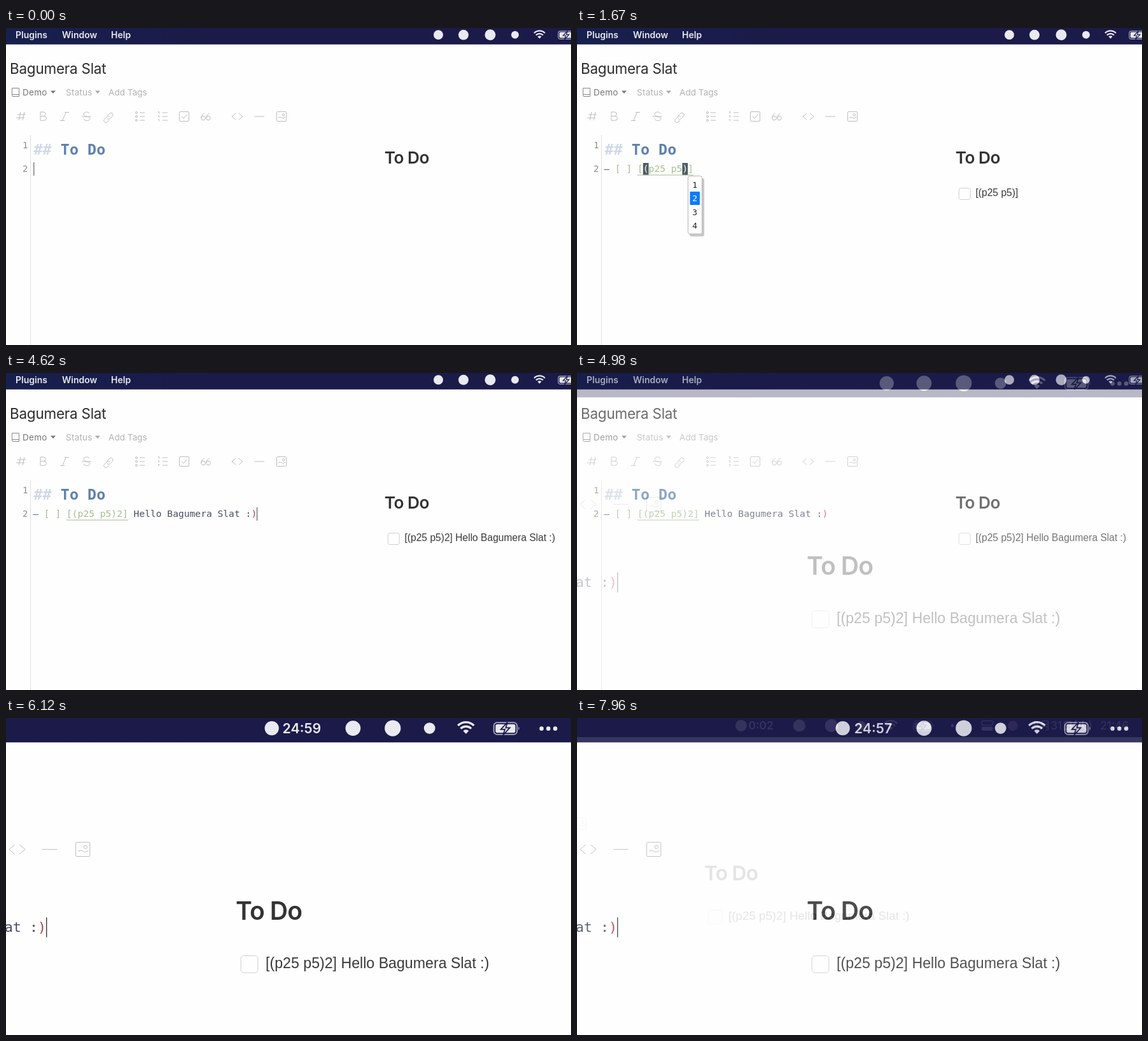
An HTML page that plays this animation: 888x498 px, repeating every 8 s.

```html
<!DOCTYPE html>
<html lang="en">
<head>
<meta charset="utf-8">
<title>Editor demo</title>
<style>
  html, body { margin: 0; width: 100%; height: 100%; overflow: hidden; background: #fefefe; }
  svg { display: block; width: 888px; height: 498px; }
  text { white-space: pre; font-family: Inter, "Noto Sans CJK JP", "Noto Sans CJK", sans-serif; }
  .mono { font-family: "DejaVu Sans Mono", monospace; }
  .preview { font-family: "Liberation Sans", sans-serif; }
  .line { fill: none; stroke: #bdbdbd; stroke-width: 1; vector-effect: non-scaling-stroke; }
</style>
</head>
<body>
<svg id="stage" viewBox="0 0 888 498"></svg>
<script>
const LOOP = 8000;
const NAME = 'Bagumera Slat';
const MESSAGE = ` Hello ${NAME} :)`;
const CHAR = 8.8, TEXT_X = 42.2;
const TYPE_START = 2430, TYPE_STEP = 82, PREVIEW_LAG = 328;
const WIDE = '', ZOOM = 'translate(-522.3 0) scale(1.485)', MID = 'translate(-515.6 -1) scale(1.203)';

const clamp = v => Math.max(0, Math.min(1, v));
const text = (x, y, size, fill, str, extra = '') =>
  `<text x="${x}" y="${y}" font-size="${size}" fill="${fill}" ${extra}>${str}</text>`;
const rect = (x, y, w, h, fill, extra = '') =>
  `<rect x="${x}" y="${y}" width="${w}" height="${h}" fill="${fill}" ${extra}/>`;
const dot = (x, y, r, fill) => `<circle cx="${x}" cy="${y}" r="${r}" fill="${fill}"/>`;
const path = (d, extra = 'class="line"') => `<path d="${d}" ${extra}/>`;
const mono = (col, str, fill) =>
  text(TEXT_X + col * CHAR, 226, 14.62, fill, str, 'class="mono"');

const toolbar =
  path('M20 145l3-13m3 13l3-13m-11 4h13m-15 5h13') +
  path('M54 132h5a3 3 0 010 6.5h-5zM54 138.5h6a3.3 3.3 0 010 6.7h-6z') +
  path('M85 145.5h7m0-13h7m-10.5 13l6-13') +
  path('M119 139h15M131 134.5c-1-4-9-3-9 1c0 4.5 10 3 10 7c0 4-9 4-10 0') +
  path('M159 138l4-4a3.2 3.2 0 014.5 4.5l-4 4a3.2 3.2 0 01-4.5 0M163 139.5a3.2 3.2 0 00-4.5 0l-4 4a3.2 3.2 0 004.5 4.5l3-3') +
  [133, 139, 145].map(y =>
    path(`M203.5 ${y}a1.5 1.5 0 113 0a1.5 1.5 0 11-3 0M210 ${y}h8M239 ${y - 1.5}h1.5v3M246 ${y}h8`)).join('') +
  rect(272.5, 131.5, 15, 15, 'none', 'class="line" rx="1.5"') + path('M276 139l3 3 5.5-6') +
  [310, 318].map(x =>
    path(`M${x - 3.3} 141.5a3.3 3.3 0 116.6 0a3.3 3.3 0 11-6.6 0q0-5 5-7.5`)).join('') +
  path('M361 134l-6 5 6 5M366 134l6 5-6 5M390 139h16') +
  rect(425.5, 131.5, 15, 15, 'none', 'class="line" rx="1"') +
  path('M434 136.5a1.8 1.8 0 113.6 0a1.8 1.8 0 11-3.6 0M428 141q3-2 5 0t6-1');

const header =
  text(6, 72, 22.5, '#2b2b2b', NAME, 'letter-spacing="-.25"') +
  path('M9.5 94.5h11v13h-9.5q-1.5 0-1.5-2zM9.5 104.5h11', 'fill="none" stroke="#888"') +
  text(26, 106, 13.6, '#777', 'Demo', 'letter-spacing=".2"') + path('M70 98.5h8l-4 4.5z', 'fill="#777"') +
  text(94, 106, 13.6, '#b2b2b2', 'Status', 'letter-spacing=".2"') + path('M140 98.5h8l-4 4.5z', 'fill="#aaa"') +
  text(161, 106, 13.6, '#b2b2b2', 'Add Tags');

function menuBar(timer, expanded) {
  const ink = '#e9e9f1';
  const timerIconX = !timer ? 679.5 : timer.length > 4 ? 633 : 643;
  const menus = [[15, 'Plugins'], [88, 'Window'], [165, 'Help']]
    .map(([x, label]) => text(x, 15.5, 14, ink, label, 'font-weight="600"')).join('');
  const marks = [[timerIconX, 7.5], [719, 8], [761, 8.5], [800, 6]]
    .map(([x, r]) => dot(x, 10.8, r, ink)).join('');
  const wifi =
    path('M830 8a12 12 0 0117 0M832.9 11.2a8 8 0 0111.2 0', `fill="none" stroke="${ink}" stroke-width="2.3"`) +
    path('M835.5 13.6a4.2 4.2 0 016 0l-3 3.2z', `fill="${ink}"`);
  const battery =
    rect(868, 4.8, 24.6, 12.6, 'none', 'rx="3.5" stroke="#a9a9bd" stroke-width="1.2"') +
    rect(869.8, 6.6, 21, 9, ink, 'rx="2"') + path('M894 9v4q2-2 0-4', 'fill="#a9a9bd"') +
    path('M882.5 4.5l-7 7.5h4.2l-1.8 6 7-7.7h-4.2z', `fill="${ink}" stroke="#1b1a49" stroke-width="1.2"`);
  const right = expanded
    ? dot(919, 10.8, 2, ink) +
      rect(957, 4.5, 15, 5.5, 'none', `rx="2.8" stroke="${ink}"`) + rect(957, 12, 15, 5.5, ink, 'rx="2.8"') +
      dot(998, 11, 6.5, '#b88cc0') +
      text(1024, 16, 14.6, ink, '5月31日(火)') + text(1112, 16, 14.6, ink, '21:46')
    : [918.5, 925.7, 933].map(x => dot(x, 11.2, 2.2, ink)).join('');
  return rect(0, 0, 1300, 25.8, 'url(#bar)') + menus + marks + wifi + battery + right +
    (timer ? text(685.2, 16, 14.4, ink, timer, 'text-anchor="end" font-weight="600"') : '');
}

function popup(selected) {
  const items = [1, 2, 3, 4].map(n => {
    const y = 246 + (n - 1) * 21.4, on = n === selected;
    return (on ? rect(177.5, y - 10.5, 15.5, 21, '#0a7cff', 'rx="1"') : '') +
      text(185.2, y + 4.8, 13, on ? '#fff' : '#222', n, 'class="mono" text-anchor="middle"');
  }).join('');
  return rect(177, 236, 23, 91.5, '#c9c9c9', 'rx="3"') +
    rect(174.5, 232.5, 22, 91, '#fff', 'rx="3" stroke="#b5b5b5"') + items;
}

function editor({ tag, typed, choice, caret }) {
  const green = '#a5bd92';
  let out = text(26, 189, 14, '#8d8d8d', '1', 'class="mono"') + text(26, 226, 14, '#8d8d8d', '2', 'class="mono"') +
    rect(38, 168, 1, 330, '#dedede') +
    text(43.5, 199, 23.4, '#cfd8e6', '##', 'class="mono" font-weight="700"') +
    text(85.8, 199, 23.4, '#5e81ac', 'To Do', 'class="mono" font-weight="700"');
  if (tag) {
    out += mono(0, '–', '#5c6296') + mono(2, '[ ]', green);
    if (choice) out += [7, 14].map(c => rect(TEXT_X + c * CHAR, 212, CHAR, 19, '#4f5b66')).join('');
    out += mono(6, tag, green) + rect(95, 230.5, tag.length * CHAR, 1, green);
    if (choice) out += mono(7, '(', '#e5ead9') + mono(14, ')', '#e5ead9');
    const complete = typed === MESSAGE.length;
    out += mono(17, MESSAGE.slice(0, complete ? -1 : typed), '#4b4f60');
    if (complete) out += mono(17 + typed - 1, ')', '#b8434f');
  }
  if (caret) {
    const col = tag ? 6 + tag.length + typed : 0;
    out += rect(TEXT_X + col * CHAR + (tag ? 0 : 1.2), 211, 0.9, 21, '#333');
  }
  return out + (choice ? popup(choice) : '');
}

function preview(content, rule) {
  return text(594.8, 213.2, 26.3, '#333', 'To Do', 'font-weight="600" letter-spacing="-.55"') +
    (rule ? rect(595.6, 229, 700, 1, '#e6e6e6') : '') +
    (content ? rect(600.3, 251.5, 18, 18, '#fff', 'rx="3" class="line" style="stroke:#cfcfcf"') +
      text(626.5, 264.4, 15.6, '#3a3a3a', content, 'class="preview"') : '');
}

const scene = (transform, opacity, s) =>
  `<g opacity="${opacity.toFixed(3)}">${rect(0, 0, 888, 498, '#fefefe')}<g transform="${transform}">` +
  menuBar(s.timer, s.expanded) + header + toolbar + editor(s) + preview(s.content, s.rule) + '</g></g>';

const lettersAt = t =>
  t < TYPE_START ? 0 : Math.min(MESSAGE.length, Math.floor((t - TYPE_START) / TYPE_STEP) + 1);

function typingState(t) {
  const choice = t < 440 || t >= 2010 ? 0 : t < 1490 ? 1 : 2;
  const tag = t < 440 ? '' : t < 2010 ? '[(p25 p5)]' : '[(p25 p5)2]';
  const content = t < 790 ? '' : t < 2180 ? '[(p25 p5)]'
    : '[(p25 p5)2]' + MESSAGE.slice(0, lettersAt(t - PREVIEW_LAG));
  return { tag, choice, content, typed: lettersAt(t), caret: !choice && t < 4700 };
}

function draw(t) {
  const done = { tag: '[(p25 p5)2]', typed: MESSAGE.length, content: '[(p25 p5)2]' + MESSAGE };
  const zoomIn = clamp((t - 4710) / 900), zoomOut = clamp((t - 7850) / 900);
  let out = '';
  if (zoomIn < 1) out += scene(WIDE, 1, typingState(t));
  if (zoomIn > 0) {
    const timer = t < 5150 ? '' : t < 6800 ? '24:59' : t < 7800 ? '24:58' : '24:57';
    const caret = (t - 5880 + LOOP) % 1000 < 500;
    out += scene(ZOOM, zoomIn, { ...done, timer, caret, rule: t > 5200 && t < 5860 });
  }
  if (zoomOut > 0) out += scene(MID, zoomOut, { ...done, timer: '0:02', expanded: true });
  return out;
}

const defs = '<defs><linearGradient id="bar" gradientUnits="userSpaceOnUse" x1="0" x2="320" y1="0" y2="0">' +
  '<stop offset="0" stop-color="#17204d"/><stop offset="1" stop-color="#1b1a49"/></linearGradient></defs>';
const stage = document.getElementById('stage');
let shown = '';
function tick() {
  const markup = defs + draw(performance.now() % LOOP);
  if (markup !== shown) stage.innerHTML = shown = markup;
  requestAnimationFrame(tick);
}
tick();
</script>
</body>
</html>
```
